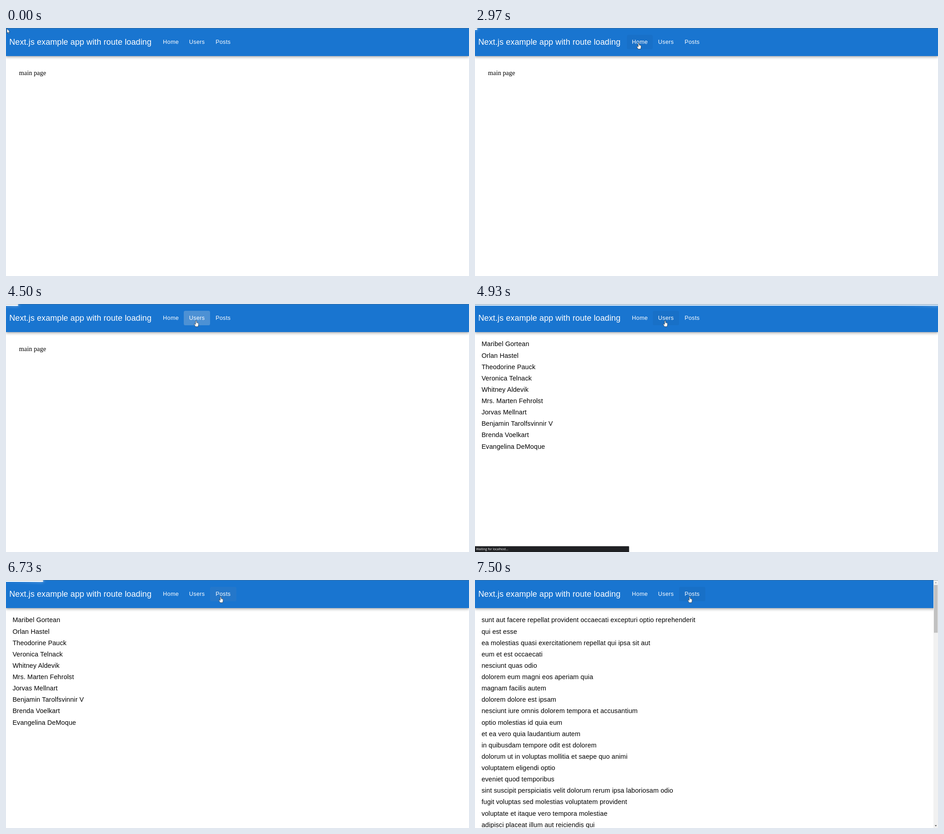
An HTML page that plays this animation: 1021x548 px, repeating every 8 s.

```html
<!DOCTYPE html>
<html lang="en">
<head>
<meta charset="utf-8">
<title>Route loading</title>
<style>
html, body { margin: 0; width: 100%; height: 100%; overflow: hidden; background: #fff; }
#stage { position: relative; width: 1021px; height: 548px; overflow: hidden; font-family: "Liberation Sans", Arial, sans-serif; }
#stage * { position: absolute; box-sizing: border-box; white-space: pre; margin: 0; animation: 8s linear infinite; }

header {
  left: 0; top: 0; width: 1021px; height: 62px; background: #1975d0; color: #fff;
  box-shadow: 0 1.8px 3.6px -.9px rgba(0,0,0,.2), 0 3.6px 4.5px rgba(0,0,0,.14), 0 .9px 9px rgba(0,0,0,.12);
}
h1 { left: 7.2px; top: 17px; font-size: 18px; line-height: 28px; font-weight: 400; letter-spacing: .0065em; }
.btn { top: 14.5px; width: 57.6px; height: 32.8px; border-radius: 3.6px; overflow: hidden; }
.btn b {
  inset: 0; font-weight: 400; font-size: 12.6px; line-height: 32.8px;
  letter-spacing: .02857em; text-align: center;
}
.btn i { inset: 0; background: rgba(0,0,0,.04); visibility: hidden; }
.btn u { left: -33px; top: -42px; width: 124px; height: 124px; border-radius: 50%; background: #fff; opacity: 0; }

#home { left: 334.8px; } #users { left: 392.4px; } #posts { left: 450px; }
#stage #home i { animation-name: hover1; } #stage #home u { animation-name: ripple1; }
#stage #users i { animation-name: hover2; } #stage #users u { animation-name: ripple2; }
#stage #posts i { animation-name: hover3; } #stage #posts u { animation-name: ripple3; }
#stage .btn i, #stage .page, #stage .status, #stage .scroll, #stage #cursor path { animation-timing-function: step-end; }
@keyframes hover1 { 0% { visibility: hidden } 23.4% { visibility: visible } 49.9%, 100% { visibility: hidden } }
@keyframes hover2 { 0% { visibility: hidden } 49.9% { visibility: visible } 71.4%, 100% { visibility: hidden } }
@keyframes hover3 { 0% { visibility: hidden } 71.4%, 100% { visibility: visible } }
@keyframes ripple1 {
  0%, 37.1% { transform: scale(0); opacity: .1 }
  43.5%, 44.9% { transform: none; opacity: .3 }
  47.1%, 100% { transform: none; opacity: 0 }
}
@keyframes ripple2 {
  0%, 52.6% { transform: scale(0); opacity: .1 }
  55.9% { transform: none; opacity: .3 }
  57.5%, 100% { transform: none; opacity: 0 }
}
@keyframes ripple3 {
  0%, 79.6% { transform: scale(0); opacity: .1 }
  82.2% { transform: none; opacity: .3 }
  84.1%, 87.9% { transform: none; opacity: .055 }
  88%, 100% { transform: none; opacity: 0 }
}

.page { left: 14.4px; top: 76.4px; font: 14.4px/25.12px "Liberation Sans", Arial, sans-serif; letter-spacing: .00938em; color: #000; }
#main { left: 28.8px; top: 91px; font: 14.4px/16px "Liberation Serif", "Times New Roman", serif; letter-spacing: 0; }
#stage #main { animation-name: page1; }
#stage #people { animation-name: page2; }
#stage #articles, #stage .scroll { animation-name: page3; }
@keyframes page1 { 0% { visibility: visible } 58%, 100% { visibility: hidden } }
@keyframes page2 { 0% { visibility: hidden } 58% { visibility: visible } 88%, 100% { visibility: hidden } }
@keyframes page3 { 0% { visibility: hidden } 88%, 100% { visibility: visible } }

.status {
  left: 0; top: 535px; width: 340px; height: 13px; padding-left: 2.6px; border-radius: 0 2px 0 0;
  border: solid #4c4e51; border-width: 1px 1px 0 0;
  background: #202124; color: #fff; font: 6.85px/12px "Open Sans", "Noto Sans", sans-serif;
}
#stage .status { animation-name: status; }
@keyframes status { 0% { visibility: hidden } 58% { visibility: visible } 63.8%, 100% { visibility: hidden } }

/* route progress bar */
#progress { left: 0; top: 0; width: 1021px; height: 3.8px; }
#bar { inset: 0; background: #fff; }
.peg {
  right: 0; width: 90px; height: 100%; transform: rotate(3deg) translate(0, -3.6px);
  box-shadow: 0 0 9px rgba(255,255,255,.8), 0 0 4.5px rgba(255,255,255,.8);
}
#stage #progress { animation-name: fade; }
#stage #bar { animation-name: grow; animation-timing-function: ease; }
@keyframes fade {
  0%, 36.99% { opacity: 0 } 37%, 42.7% { opacity: 1 } 44.5%, 55.89% { opacity: 0 }
  55.9%, 61.25% { opacity: 1 } 63.1%, 81.79% { opacity: 0 }
  81.8%, 91.7% { opacity: 1 } 93.6%, 100% { opacity: 0 }
}
@keyframes grow {
  0%, 37%, 44.51%, 55.9%, 63.2%, 81.8% { transform: translateX(-100%) }
  38.9%, 57.6%, 57.8%, 83.6%, 87.9% { transform: translateX(-92%) }
  40.8%, 59.5%, 89.8% { transform: translateX(-45%) }
  42.7%, 44.5%, 61.25%, 63.1%, 91.7%, 100% { transform: none }
}

.scroll { left: 1011px; top: 0; width: 10px; height: 548px; background: #f1f1f1; }
.edge { left: 0; top: 0; width: 1021px; height: 1px; background: rgba(80,100,115,.5); }

#cursor { left: 0; top: 0; overflow: visible; }
#stage #cursor { animation-name: travel; }
#cursor path { fill: #fff; stroke: #111; stroke-width: .6; stroke-linejoin: round; }
#cursor #beam { fill: none; stroke: #d9a27c; stroke-width: .9; }
#stage #arrow { animation-name: arrow; }
#stage #beam { animation-name: beam; }
#stage #hand { animation-name: hand; }
@keyframes travel {
  0%, 1.25% { transform: translate(2px, 1.5px) }
  2.94% { transform: translate(20px, 86px) }
  4.625%, 12.5% { transform: translate(6px, 59px) }
  15.6% { transform: translate(60px, 40px) }
  19.4% { transform: translate(170px, 19px) }
  22.125% { transform: translate(297px, 33px) }
  22.5%, 22.875% { transform: translate(320px, 28px) }
  23.75%, 26.25% { transform: translate(343px, 33px) }
  28.75%, 38.1% { transform: translate(361px, 33px) }
  41.25%, 47.5% { transform: translate(367.5px, 33px) }
  52.5%, 68.75% { transform: translate(419.2px, 36.5px) }
  73.4%, 100% { transform: translate(473.5px, 36.5px) }
}
@keyframes arrow {
  0% { visibility: visible } 15.6% { visibility: hidden }
  22.3% { visibility: visible } 23.4%, 100% { visibility: hidden }
}
@keyframes beam { 0% { visibility: hidden } 15.6% { visibility: visible } 22.3%, 100% { visibility: hidden } }
@keyframes hand { 0% { visibility: hidden } 23.4%, 100% { visibility: visible } }
</style>
</head>
<body>
<div id="stage">
<div id="main" class="page">main page</div>
<div id="people" class="page">Maribel Gortean
Orlan Hastel
Theodorine Pauck
Veronica Telnack
Whitney Aldevik
Mrs. Marten Fehrolst
Jorvas Mellnart
Benjamin Tarolfsvinnir V
Brenda Voelkart
Evangelina DeMoque</div>
<div id="articles" class="page">sunt aut facere repellat provident occaecati excepturi optio reprehenderit
qui est esse
ea molestias quasi exercitationem repellat qui ipsa sit aut
eum et est occaecati
nesciunt quas odio
dolorem eum magni eos aperiam quia
magnam facilis autem
dolorem dolore est ipsam
nesciunt iure omnis dolorem tempora et accusantium
optio molestias id quia eum
et ea vero quia laudantium autem
in quibusdam tempore odit est dolorem
dolorum ut in voluptas mollitia et saepe quo animi
voluptatem eligendi optio
eveniet quod temporibus
sint suscipit perspiciatis velit dolorum rerum ipsa laboriosam odio
fugit voluptas sed molestias voluptatem provident
voluptate et itaque vero tempora molestiae
adipisci placeat illum aut reiciendis qui</div>
<header>
<h1>Next.js example app with route loading</h1>
<div id="home" class="btn"><i></i><b>Home</b><u></u></div>
<div id="users" class="btn"><i></i><b>Users</b><u></u></div>
<div id="posts" class="btn"><i></i><b>Posts</b><u></u></div>
</header>
<div id="progress"><div id="bar"><div class="peg"></div></div></div>
<div class="status">Waiting for localhost...</div>
<svg class="scroll" viewBox="0 0 10 548">
<path fill="#c1c1c1" d="M1 11H9.2V116.5H1Z"/>
<path fill="#a3a3a3" d="M2.8 7L5.1 4.4L7.4 7Z"/>
<path fill="#505050" d="M2.8 541.8L5.1 544.4L7.4 541.8Z"/>
</svg>
<div class="edge"></div>
<svg id="cursor" width="10" height="14">
<path id="arrow" d="M0 0V9.8L2.3 7.7L3.9 11.3L5.4 10.6L3.9 7.2H7Z"/>
<path id="beam" d="M-2.5 -5.5H-.6L0 -5L.6 -5.5H2.5M0 -5V5M-2.5 5.5H-.6L0 5L.6 5.5H2.5"/>
<path id="hand" transform="scale(1.08)" d="M-1 .8Q0 -.4 1 .8V4.6Q2.2 4 2.9 5Q4.2 4.6 4.8 6V8.5Q4.8 10.5 3.8 12.5H-1.2Q-2 11 -3.8 8.2Q-4 6.6 -2.6 7L-1 8Z"/>
</svg>
</div>
</body>
</html>
```
